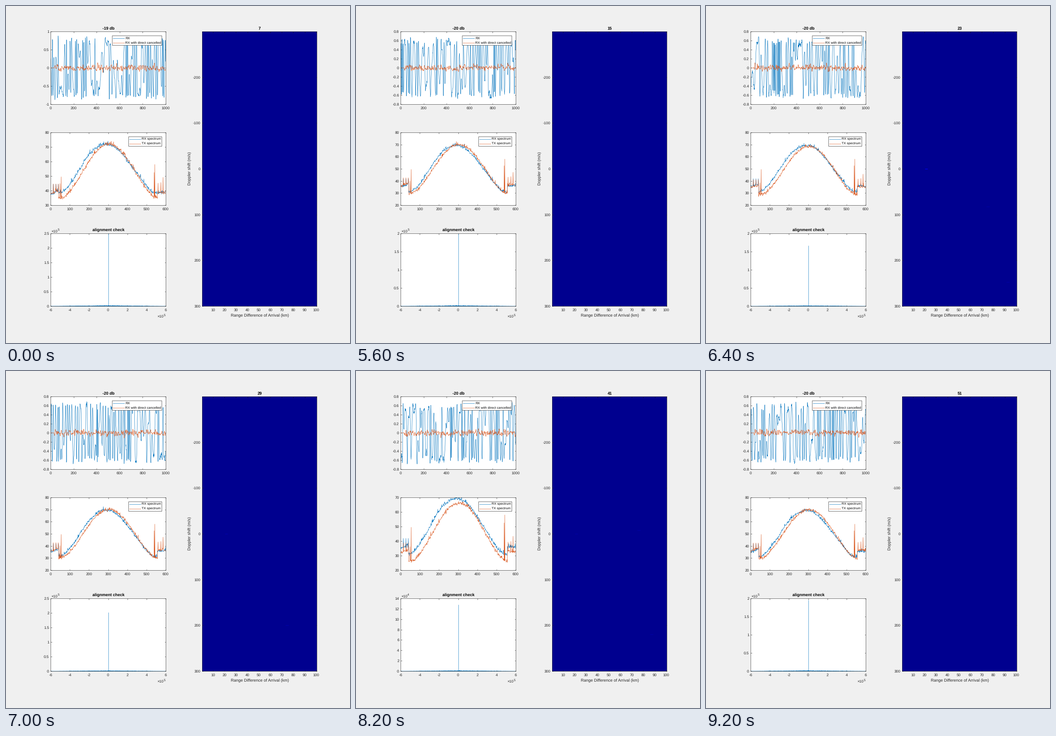
Animation of 756x741 px, one loop 9.4 s. Source, as a matplotlib script:

```python
import numpy as np
import matplotlib
import matplotlib.pyplot as plt
from matplotlib.animation import FuncAnimation
from matplotlib.collections import LineCollection
from matplotlib.patches import Rectangle

W, H, DPI = 756, 741, 64
PT = 72 / DPI  # points per pixel
STEP = 200
FRAMES = 47
HOLD = 24  # ticks the first sweep stays on screen

BLUE, ORANGE, INK = "#0072BD", "#D95319", "#262626"
NAVY = np.array([0, 0, 0.56])
LINE = 0.65 * PT

matplotlib.rcParams["font.family"] = "Liberation Sans"
matplotlib.rcParams["axes.unicode_minus"] = False
matplotlib.rcParams["text.hinting"] = "none"

# Transmit level in dB; amplitude, axis limits and peak height follow from it
SWEEP = [0, 1, 2, 3, 4, 7, 8, 10, 14, 15, 16, 17, 18, 22]
LEVEL = [71.94, 70.46, 69.8, 70.5, 69.95, 70.3, 68.4, 70.05, 70.1, 69.7, 70.2,
         66.12, 69.4, 69.8]

T = np.arange(1000)
BIN = np.arange(600)
LAG = np.linspace(-6, 6, 1200)


def smooth(rng, n, width):
    y = np.convolve(rng.normal(size=n + width), np.hanning(width + 2), "same")[:n]
    return y / y.std()


def bump(center, width):
    return np.exp(-((BIN - center) / width) ** 2)


def wave(rng, amp):
    """Frequency modulated carrier with bursts and an uneven envelope."""
    bursts = np.clip(smooth(rng, 1000, 130) - 0.9, 0, 1)
    freq = 0.045 * smooth(rng, 1000, 30) + 0.06 * bursts
    phase = 2 * np.pi * np.cumsum(freq) + rng.uniform(0, 6)
    envelope = amp * (1 + 0.07 * smooth(rng, 1000, 14))
    y = envelope * np.sin(phase) + 0.025 * smooth(rng, 1000, 2)
    return np.clip(y, -1.14 * amp, 1.14 * amp)


def residue(rng, amp):
    y = 0.055 * amp * smooth(rng, 1000, 7)
    y[:30] = 0
    return y


def spectrum(rng, peak, base, edge, center):
    u = np.clip(np.abs(BIN - center) / 252, 0, 1)
    y = base + (peak - base) * (0.5 + 0.5 * np.cos(np.pi * u)) ** 0.85
    y[:42] = edge + np.linspace(-1, 1.5, 42)
    y[557:] = edge
    y += 0.55 * smooth(rng, 600, 2)
    hairs = rng.integers(0, 600, 40)
    y[hairs] += rng.uniform(0.5, 2.2, 40)
    y[[14, 28, 40]] = edge + 6
    return y


def rx_spectrum(rng, level):
    excess = max(0, level - 70)
    peak = 69.3 + 1.3 * excess
    y = spectrum(rng, peak, peak - 38.4 + 2.5 * excess, peak - 33.4, 293)
    return y + 1.5 * bump(190, 60) + 1.5 * bump(470, 45)


def tx_spectrum(rng, level):
    base = level - 40 + 1.5 * max(0, level - 70)
    y = spectrum(rng, level, base, level - 33.3, 304)
    y[[49, 55]] = base + 10, 49.5
    y[[540, 543]] = 52.5, 58
    y[[560, 575, 586]] = level - 33.3 + np.array([6.5, 7, 10.5])
    return y


fig = plt.figure(figsize=(W / DPI, H / DPI), dpi=DPI, facecolor="#F0F0F0")


def panel(left, top, right, bottom, xticks, xlim, face="white"):
    ax = fig.add_axes([left / W, 1 - bottom / H, (right - left) / W,
                       (bottom - top) / H], facecolor=face)
    ax.tick_params(direction="in", top=True, right=True, length=2.5 * PT,
                   width=LINE, color=INK, labelcolor=INK, labelsize=8.4 * PT)
    ax.tick_params(axis="x", pad=5 * PT)
    ax.tick_params(axis="y", pad=3.2 * PT)
    for spine in ax.spines.values():
        spine.set(linewidth=LINE, color=INK)
    ax.set_xlim(*xlim)
    ax.set_xticks(xticks)
    return ax


def scale(ax, lo, hi, step):
    ticks = np.arange(lo, hi + step / 2, step).round(3) + 0.0
    ax.set_ylim(lo, hi)
    ax.set_yticks(ticks, [f"{v:g}" for v in ticks])


wave_ax = panel(98, 56, 351, 216, range(0, 1001, 200), (0, 1000))
spec_ax = panel(98, 278, 351, 438, range(0, 601, 100), (0, 600))
peak_ax = panel(98, 500, 351, 660, range(-6, 7, 2), (-6, 6))
map_ax = panel(431, 56, 683, 660, range(10, 101, 10), (0.5, 100.5), NAVY)
map_ax.set_ylim(300, -299.9)
map_ax.set_yticks(range(-200, 301, 100))

rx_line, = wave_ax.plot([], [], color=BLUE, lw=LINE)
cut_line, = wave_ax.plot([], [], color=ORANGE, lw=LINE)
rx_spec, = spec_ax.plot([], [], color=BLUE, lw=LINE)
tx_spec, = spec_ax.plot([], [], color=ORANGE, lw=LINE)
floor_line, = peak_ax.plot([], [], color=BLUE, lw=LINE)
spike_line, = peak_ax.plot([], [], color=BLUE, lw=LINE)
echoes = LineCollection([], linewidths=1.2 * PT, capstyle="butt")
map_ax.add_collection(echoes, autolim=False)

# Pixel-space layer for titles, labels and legends
over = fig.add_axes([0, 0, 1, 1], zorder=5)
over.set(xlim=(0, W), ylim=(H, 0))
over.axis("off")


def text(x, y, s, size, **kw):
    kw = {"color": INK, "va": "baseline", **kw}
    return over.text(x, y, s, fontsize=size * PT, **kw)


def title(x, y, s=""):
    return text(x, y, s, 9, weight="bold", ha="center", color="black")


def power(x, y, exponent):
    text(x, y, "×10", 8.2)
    return text(x + 14.3, y - 3.6, exponent, 6.6)


def legend(left, top, width, names):
    over.add_patch(Rectangle((left, top), width, 21, facecolor="white",
                             edgecolor=INK, lw=LINE))
    for i, (name, color) in enumerate(zip(names, (BLUE, ORANGE))):
        y = top + 6 + 10 * i
        over.plot([left + 2, left + 26.5], [y, y], color=color, lw=LINE)
        text(left + 29, y + 2, name, 7.4, color="black")


db_title = title(225, 51.6)
count_title = title(557.5, 51.6)
title(225, 495.4, "alignment check")
text(557.5, 683.2, "Range Difference of Arrival (km)", 9, ha="center")
text(403.5, 357, "Doppler shift (m/s)", 9, rotation=90, ha="center", va="center")
power(332, 685.3, "5")
peak_exp = power(99, 498, "5")
legend(233, 65, 109, ("RX", "RX with direct cancelled"))
legend(269, 287, 73, ("RX spectrum", "TX spectrum"))


def draw_wave(rng, loud):
    amp = 0.77 if loud else 0.6
    if loud:
        scale(wave_ax, -1, 1, 0.5)
    else:
        scale(wave_ax, -0.8, 0.8, 0.2)
    db_title.set_text("-19 db" if loud else "-20 db")
    rx_line.set_data(T, wave(rng, amp))
    cut_line.set_data(T, residue(rng, amp))


def draw_spectra(rng, level, loud):
    scale(spec_ax, 30 if loud else 20, 80 if level > 68 else 70, 10)
    rx_spec.set_data(BIN, rx_spectrum(rng, level))
    tx_spec.set_data(BIN, tx_spectrum(rng, level))


def draw_peak(rng, level):
    height = 2 * 10 ** ((level - 70) / 20)
    small = height < 1.4
    if small:
        height *= 10
        scale(peak_ax, 0, 14, 2)
    else:
        scale(peak_ax, 0, 2.5 if height > 2 else 2, 0.5)
    peak_exp.set_text("4" if small else "5")
    spike_line.set_data([0, 0], [0, height])
    hump = 0.009 * height * (1 - np.abs(LAG) / 6)
    floor_line.set_data(LAG, hump * rng.uniform(0, 1.1, LAG.size))


def draw_echoes(rng, k):
    """Still clutter near 20 km that flares once, plus a few faint movers."""
    glow = 0.25 * np.sin(np.pi * np.clip((k - 3) / 19, 0, 1))
    flare = 0.7 * np.exp(-(k - 8) ** 2)
    marks = [(21.5, 0, glow + flare)]
    for _ in range(rng.integers(1, 4)):
        marks.append((rng.uniform(30, 96), rng.uniform(-100, 280), glow))
    echoes.set_segments([[(x - 1.3, v), (x + 1.3, v)] for x, v, _ in marks])
    echoes.set_color([tuple(NAVY + [0, 0, 0.44 * s]) for *_, s in marks])


def draw(n):
    k = max(0, n - HOLD)
    rng = np.random.default_rng(100 + k)
    level = np.interp(k, SWEEP, LEVEL)
    loud = level > 70.4

    count_title.set_text(str(7 + 2 * k))
    draw_wave(rng, loud)
    draw_spectra(rng, level, loud)
    draw_peak(rng, level)
    draw_echoes(rng, k)


anim = FuncAnimation(fig, draw, frames=FRAMES, interval=STEP, repeat=True)
plt.show()
```
